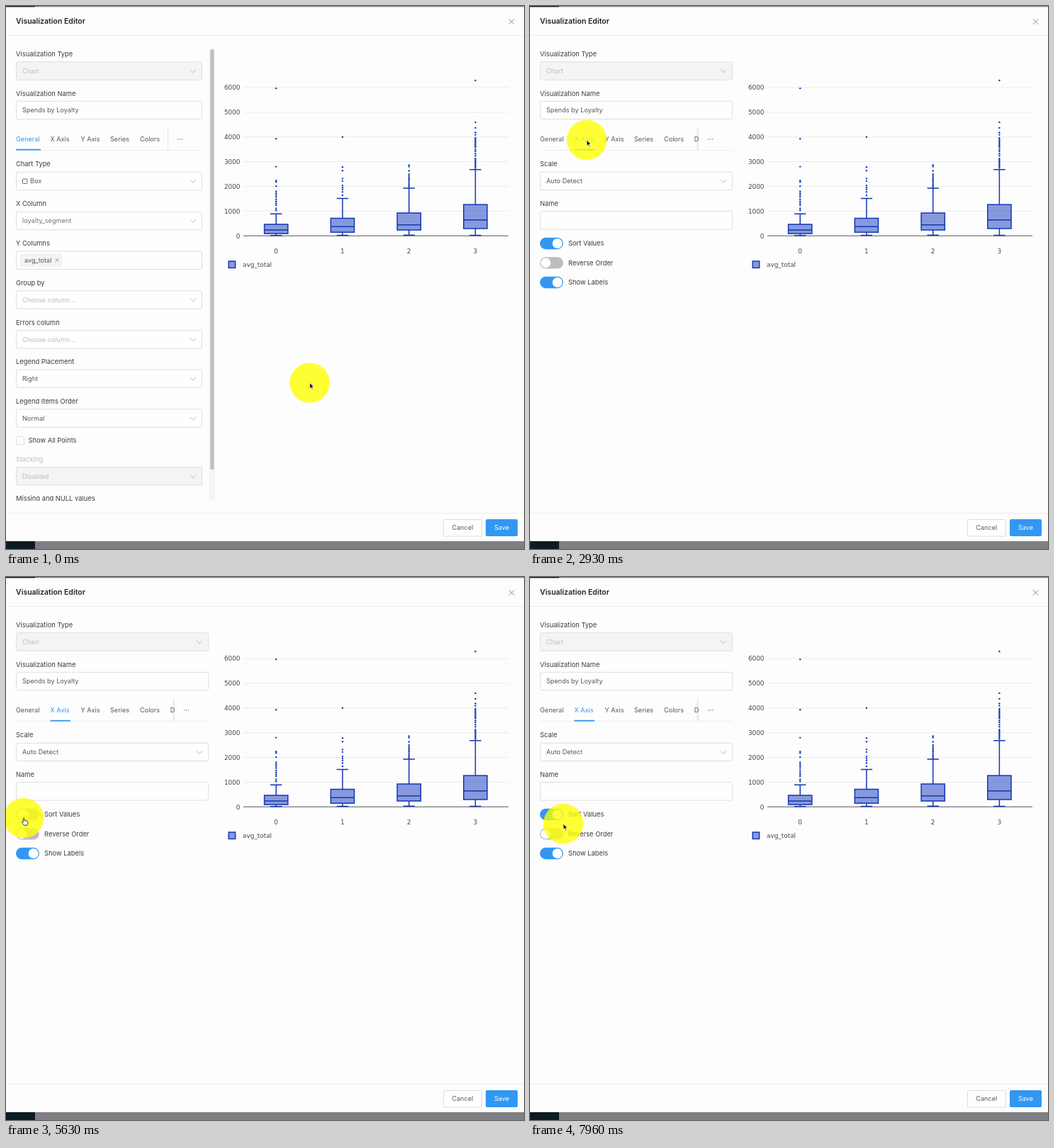
An HTML page that plays this animation: 731x766 px, repeating every 8 s.

```html
<!DOCTYPE html>
<html lang="en">
<head>
<meta charset="utf-8">
<title>Visualization Editor</title>
<style>
html, body { margin: 0; width: 100%; height: 100%; overflow: hidden; background: #fdfdfd; }
svg { display: block; font-family: Inter, sans-serif; font-size: 9.15px; }
.label { font-size: 9.35px; fill: #3c3c3c; }
.value { fill: #585858; }
.soft { fill: #757575; }
.hint { fill: #bdbdbd; }
.tick { font-family: "DejaVu Sans", sans-serif; font-size: 8.9px; fill: #444; }
</style>
</head>
<body>
<svg id="stage" width="731" height="766" viewBox="0 0 731 766"></svg>
<script>
const BLUE = '#3297f3', INK = '#1237b4', LOOP = 8000;
const stage = document.getElementById('stage');
const get = id => document.getElementById(id);

// Drawing helpers
const text = (s, x, cy, cls = 'value', more = '') =>
  `<text x="${x}" y="${cy + 3.3}" class="${cls}" ${more}>${s}</text>`;
const rect = (x, y, w, h, fill, more = '') =>
  `<rect x="${x}" y="${y}" width="${w}" height="${h}" fill="${fill}" ${more}/>`;
const path = (d, stroke, width = 1, more = '') =>
  `<path d="${d}" fill="none" stroke="${stroke}" stroke-width="${width}" ${more}/>`;
const cross = (x, y, r, stroke) =>
  path(`M${x - r} ${y - r}l${2 * r} ${2 * r}M${x + r} ${y - r}l${-2 * r} ${2 * r}`, stroke);

function field(cy, w, s, cls, o = {}) {
  return rect(14.5, cy - 12.7, w - 1, 25.4, o.off ? '#f4f4f4' : '#fefefe',
      `stroke="#dedede" rx="2" ${o.id ? `id="${o.id}"` : ''}`) +
    text(s, o.x || 23, cy, cls) +
    (o.plain ? '' : path(`M${w - 3} ${cy - 1.8}l4 4.2l4-4.2`, '#b8b8b8'));
}

function heading(w) {
  return text('Visualization Type', 14, 67.5, 'label') +
    field(91.5, w, 'Chart', 'hint', { off: 1 }) +
    text('Visualization Name', 14, 123.3, 'label') +
    field(147, w, 'Spends by Loyalty', 'value', { plain: 1 });
}

function tabs(active, w) {
  const names = [['General', 14, 35], ['X Axis', 62.5, 28.5], ['Y Axis', 105.5], ['Series', 147], ['Colors', 189]];
  let s = path(`M14 203.5H${14 + w}`, '#efefef');
  names.forEach(([name, x, len], i) => {
    s += text(name, x, 187.5, 'value', i === active ? `style="fill:${BLUE}"` : `id="tab${active}${i}"`);
    if (i === active) s += rect(x, 201.8, len, 1.8, BLUE);
  });
  const dots = w > 265 ? 254.5 : 245.5;
  [-3, 0, 3].forEach(d => s += `<circle cx="${dots + d}" cy="188" r=".75" fill="#777"/>`);
  return s;
}

function generalPanel() {
  const w = 263;
  let s = heading(w) + tabs(0, w) + path('M228.5 172V203', '#e6e6e6');
  const row = (name, cy, value, cls, o) =>
    text(name, 14, cy, o && o.off ? 'label hint' : 'label',
      o && o.off ? 'style="fill:#bdbdbd"' : '') + field(cy + 24, w, value, cls, o);
  s += row('Chart Type', 223, 'Box', 'value', { x: 34, id: 'selType' }) +
    rect(23.5, 244, 6.5, 6.5, 'none', 'stroke="#666" rx="1.2"') +
    row('X Column', 279, 'loyalty_segment', 'soft', { id: 'selColumn' }) +
    row('Y Columns', 334.7, '', 'value', { plain: 1 }) +
    rect(20.5, 350.5, 58, 16.5, '#f4f4f4', 'stroke="#ececec" rx="1.5"') +
    text('avg_total', 26, 358.7) + cross(72, 358.5, 2.3, '#8a8a8a') +
    row('Group by', 390.4, 'Choose column...', 'hint') +
    row('Errors column', 446.2, 'Choose column...', 'hint') +
    row('Legend Placement', 501.8, 'Right', 'value') +
    row('Legend Items Order', 557.5, 'Normal', 'value') +
    rect(14.5, 607.5, 11, 11, '#fefefe', 'stroke="#dedede" rx="1.5"') +
    text('Show All Points', 31.5, 613, 'label') +
    row('Stacking', 639.2, 'Disabled', 'hint', { off: 1 }) +
    text('Missing and NULL values', 14, 694.8, 'label');
  return `<g id="general"><g clip-path="url(#scroll)">${s}</g>` +
    rect(286.5, 61, 8.5, 637, '#f4f4f4') + rect(288.3, 61, 5.2, 593, '#bdbdbd', 'rx="2.6"') + '</g>';
}

function toggle(id, cy, name) {
  return rect(14, cy - 8.2, 32.8, 16.4, BLUE, `rx="8.2" id="${id}Track"`) +
    rect(31.6, cy - 7, 14, 14, '#fff', `rx="7" id="${id}Knob"`) +
    text(name, 54, cy, 'label');
}

function axisPanel() {
  const w = 272;
  return '<g id="axis">' + heading(w) + tabs(1, w) +
    `<g clip-path="url(#tabEnd)">${text('Data Labels', 231.8, 187.5)}</g>` +
    rect(234, 172, 4, 31, 'url(#fade)') +
    text('Scale', 14, 223, 'label') + field(247, w, 'Auto Detect', 'value', { id: 'selScale' }) +
    text('Name', 14, 279, 'label') + field(302.3, w, '', 'value', { plain: 1 }) +
    toggle('sort', 335, 'Sort Values') + toggle('reverse', 362.4, 'Reverse Order') +
    toggle('labels', 390, 'Show Labels') + '</g>';
}

// Box plot: [centre, low, q1, median, q3, high, outliers]
const run = (from, to, step) =>
  Array.from({ length: Math.floor((from - to) / step) + 1 }, (_, i) => from - i * step);
const boxes = [
  [381.2, 15, 90, 235, 465, 885,
    [5970, 3930, 2800, 2240, 2180, 2010, 1800, 1720, 1650, 1570, 1470, 1390, 1310, 1240, 1110, 1030]],
  [474.9, 20, 145, 375, 710, 1510,
    [4000, 2780, 2640, 2320, 2220, 2040, 1960, 1880, 1780, 1640]],
  [568.7, 25, 235, 445, 925, 1930, [2860, 2800, 2630, ...run(2500, 1970, 66)]],
  [662.4, 20, 295, 645, 1265, 2685,
    [6290, 4600, 4370, 4180, 4090, ...run(3970, 3570, 55), 3490, 3420, 3330, 3240, ...run(3130, 2700, 55)]]
];

function chart(id, zero, unit, named) {
  const y = v => zero - v * unit;
  let s = '';
  for (let v = 6000; v >= 0; v -= 1000) {
    s += path(`M335 ${y(v)}H709`, v ? '#ebebeb' : '#555', 1) +
      text(v, 330.5, y(v), 'tick', 'text-anchor="end"');
  }
  boxes.forEach(([x, low, q1, mid, q3, high, dots], i) => {
    s += rect(x - 16.6, y(q3), 33.2, y(q1) - y(q3), 'rgba(18,55,190,.5)', `stroke="${INK}" stroke-width="1.5"`) +
      path(`M${x - 16.6} ${y(mid)}h33.2M${x} ${y(q1)}V${y(low)}M${x} ${y(q3)}V${y(high)}` +
        `M${x - 8.2} ${y(low)}h16.4M${x - 8.2} ${y(high)}h16.4`, INK, 1.5);
    dots.forEach(v => s += `<circle cx="${x}" cy="${y(v)}" r="1.2" fill="${INK}"/>`);
    if (named) s += text(i, x, 345.3, 'tick', 'text-anchor="middle"');
  });
  return `<g id="${id}">${s}</g>`;
}

function pointer() {
  const arrow = 'M0 0V8.2L1.9 6.5L3.2 9.4L4.6 8.8L3.3 6L5.9 5.9Z';
  const hand = 'M-.8 1C-.8-.2 1-.2 1 1V4C1.4 3.2 2.5 3.3 2.7 4.1C3.2 3.5 4.2 3.7 4.3 4.5' +
    'C4.9 4.1 5.7 4.5 5.7 5.3V7.2C5.7 8.5 4.9 9 4.9 10.2H.3C0 8.8-1.6 7.7-2.4 6.3C-2.8 5.4-1.7 4.9-.8 6Z';
  return `<g id="pointer"><circle r="28.2" fill="#ff0" fill-opacity=".79"/>` +
    `<path id="arrow" d="${arrow}" fill="#111" stroke="#fff" stroke-width=".7"/>` +
    `<path id="hand" d="${hand}" fill="#fff" stroke="#222" stroke-width=".9"/></g>`;
}

stage.innerHTML = `<defs>
  <clipPath id="scroll"><rect width="286" height="698"/></clipPath>
  <clipPath id="tabEnd"><rect x="228" y="170" width="10" height="32"/></clipPath>
  <linearGradient id="fade"><stop stop-color="#000" stop-opacity="0"/><stop offset="1" stop-color="#000" stop-opacity=".1"/></linearGradient>
</defs>` +
  rect(0, 0, 731, 766, '#fdfdfd') +
  rect(0, 0, 731, 1.3, '#808084') + rect(0, 0, 41, 1.3, '#0d1b22') +
  rect(0, 755, 731, 11, '#808084') + rect(0, 755, 41, 11, '#0d1b22') +
  path('M0 41.5H731M0 715.5H731', '#ececec') +
  text('Visualization Editor', 14, 21.5, '', 'style="font-size:10.5px;font-weight:600;fill:#222"') +
  cross(713.5, 22, 3.8, '#8c8c8c') +
  rect(617.5, 724.5, 54, 23.5, '#fefefe', 'stroke="#dcdcdc" rx="2"') +
  text('Cancel', 644.3, 736, 'value', 'text-anchor="middle"') +
  rect(677, 724, 45, 24, BLUE, 'rx="2"') +
  text('Save', 699.5, 736, '', 'text-anchor="middle" fill="#fff"') +
  generalPanel() + axisPanel() +
  chart('labelled', 324.2, .03485, true) + chart('bare', 337.6, .03685, false) +
  rect(314.2, 360, 9.4, 9.4, 'rgba(18,55,190,.5)', `stroke="${INK}" stroke-width="1.5"`) +
  text('avg_total', 334, 365, 'tick') + pointer();

// Pointer path: [time, x, y, eased]
const route = [
  [0, 428.6, 531.6], [230, 428.6, 531.6], [930, 80, 189, 1], [3030, 80, 189],
  [3660, 49, 304], [3860, 39, 338], [4430, 39, 338], [4600, 41, 338], [5060, 24, 337, 1],
  [5400, 24, 337], [5630, 25, 340], [5700, 25.5, 341], [6200, 34.5, 392.5, 1],
  [6560, 34, 391], [6700, 34, 391], [7030, 28.5, 391, 1], [7160, 27.5, 389],
  [7700, 27.5, 389], [7960, 47, 348, 1], [LOOP, 47, 348]
];
const smooth = p => p * p * (3 - 2 * p);
const ramp = (t, a, b) => smooth(Math.min(1, Math.max(0, (t - a) / (b - a))));

function place(t) {
  const i = Math.max(1, route.findIndex(k => k[0] >= t));
  const [a, b] = [route[i - 1], route[i]];
  let p = (t - a[0]) / (b[0] - a[0]);
  if (b[3]) p = smooth(p);
  return [a[1] + (b[1] - a[1]) * p, a[2] + (b[2] - a[2]) * p];
}

const mix = (a, b, p) => `rgb(${a.map((v, i) => Math.round(v + (b[i] - v) * p))})`;
const show = (id, on) => get(id).setAttribute('display', on ? 'inline' : 'none');

function setToggle(id, on, press) {
  get(id + 'Track').setAttribute('fill', mix([189, 189, 189], [50, 151, 243], on));
  get(id + 'Knob').setAttribute('x', 15.2 + on * (16.4 - 3 * press));
  get(id + 'Knob').setAttribute('width', 14 + 3 * press);
}

function hover(id, cy, x, y) {
  const p = x < 277 ? .4 * Math.max(0, 1 - Math.abs(y - cy) / 20) : 0;
  get(id).setAttribute('stroke', mix([222, 222, 222], [64, 169, 255], p));
}

function draw(t) {
  const [x, y] = place(t);
  const onAxis = t >= 2200, bare = t >= 6460 && t < 7780;
  const pointing = (t >= 600 && t < 2200) || (t >= 3280 && t < 7900);
  show('general', !onAxis);
  show('axis', onAxis);
  show('labelled', !bare);
  show('bare', bare);
  show('arrow', !pointing);
  show('hand', pointing);
  get('pointer').setAttribute('transform', `translate(${x} ${y})`);
  get('tab01').style.fill = t >= 860 ? '#6bbcff' : '';
  hover('selType', 247, x, y);
  hover('selColumn', 303, x, y);
  hover('selScale', 247, x, y);
  setToggle('sort', 1 - ramp(t, 4430, 4640) + ramp(t, 5640, 5860),
    ramp(t, 4130, 4200) - ramp(t, 4430, 4530) + ramp(t, 5430, 5500) - ramp(t, 5640, 5740));
  setToggle('reverse', 0, 0);
  setToggle('labels', 1 - ramp(t, 6340, 6540) + ramp(t, 7660, 7860),
    ramp(t, 6230, 6290) - ramp(t, 6340, 6440) + ramp(t, 7460, 7500) - ramp(t, 7660, 7760));
}

function tick() {
  draw(performance.now() % LOOP);
  requestAnimationFrame(tick);
}
tick();
</script>
</body>
</html>
```
